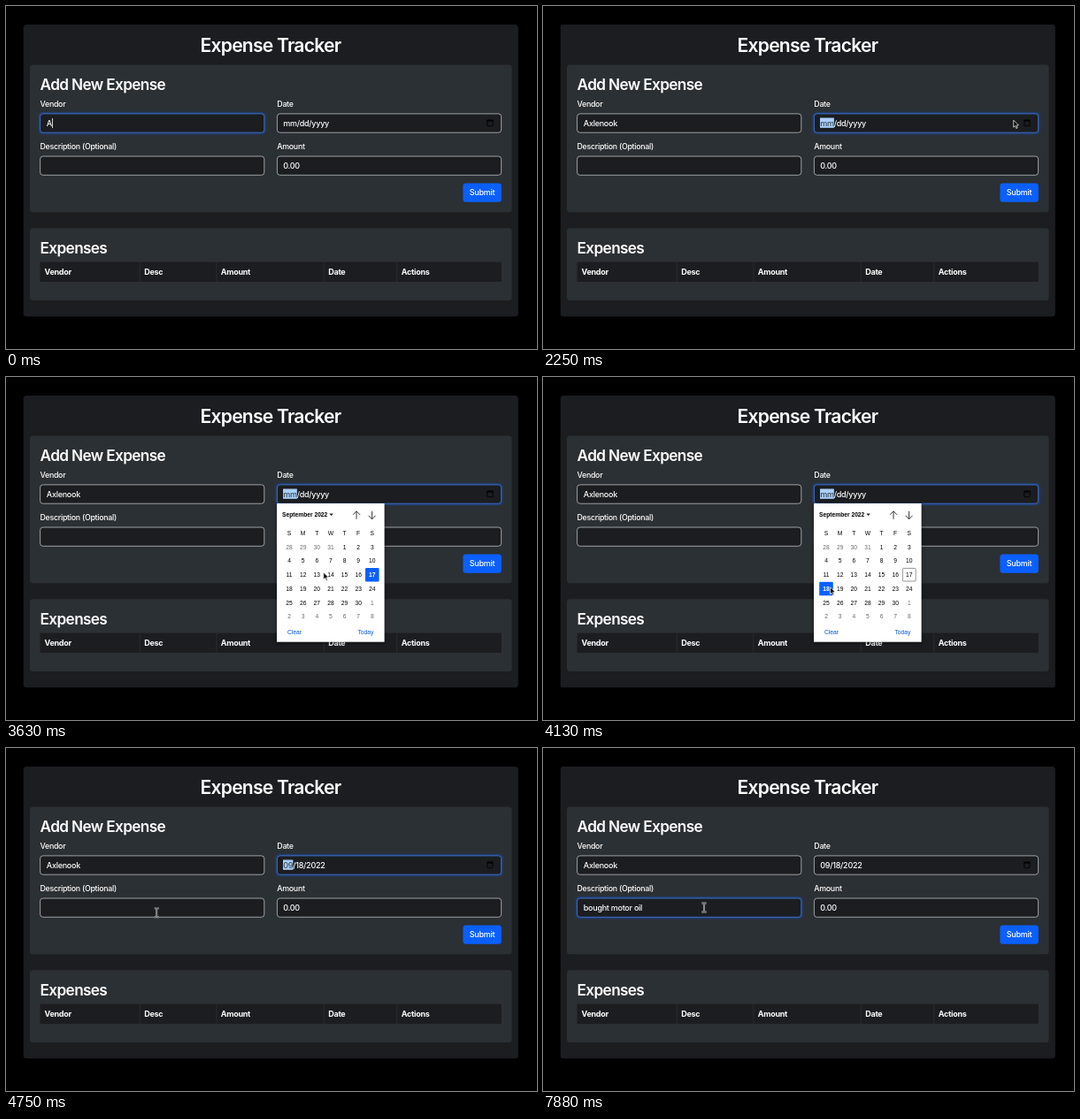
An HTML page with a canvas that plays this animation: 600 px wide and 388 px high, repeating every 8 s.

```html
<!DOCTYPE html>
<html lang="en">
<head>
<meta charset="utf-8">
<title>Expense Tracker</title>
<style>
  html, body { margin: 0; width: 100%; height: 100%; overflow: hidden; background: #000; }
  canvas { display: block; width: 600px; height: 388px; }
</style>
</head>
<body>
<canvas id="stage"></canvas>
<script>
const W = 600, H = 388, LOOP = 8000, STEP = 125;
const UI = 'Inter, "Open Sans", sans-serif';
const ARIAL = '"Liberation Sans", Arial, sans-serif';
const PANEL = '#1c1d21', CARD = '#2b3034', FIELD = '#1b1d20', BLUE = '#0a60ff';
const FIELD_W = 253.2, FIELD_H = 21.3;
const LEFT = 38.6, RIGHT = 306.4, TOP = 121.9, BOTTOM = 170;

const FOCUS_DATE = 1200, FOCUS_DESC = 4950;
const OPEN = 2750, PICK = 4125, CLOSE = 4250;
const SHOW = 625, HIDE = 5375, RETURN = 7875;

// Typing bursts: start, duration, text
const vendor = [[0, 500, 'Axlenook']];
const desc = [[5000, 0, ''], [5375, 500, 'bought '], [6125, 500, 'motor '], [7000, 375, 'oil']];

// Mouse moves: start, end, target
const moves = [
  [SHOW, 1000, 548, 211],
  [1125, 2000, 543, 211],
  [2000, 2250, 531.5, 129],
  [2250, 2500, 543.7, 131],
  [2875, 3875, 324.3, 237.5],
  [PICK, 4425, 168, 203],
  [4500, 4875, 171, 180.5],
  [7500, RETURN, 182, 180.5]
];

const canvas = document.getElementById('stage');
const ctx = canvas.getContext('2d');
const dpr = window.devicePixelRatio || 1;
canvas.width = W * dpr;
canvas.height = H * dpr;

const clamp = v => Math.max(0, Math.min(1, v));
const smooth = v => v * v * (3 - 2 * v);
const mix = (a, b, k) => a + (b - a) * k;

function text(s, x, y, size, opts = {}) {
  const { weight = 500, color = '#fff', family = UI, align = 'left', track = -0.03 } = opts;
  ctx.font = `${weight} ${size}px ${family}`;
  ctx.letterSpacing = `${track * size}px`;
  ctx.textAlign = align;
  ctx.fillStyle = color;
  ctx.fillText(s, x, y);
  return ctx.measureText(s).width;
}

const heading = (s, x, y, size, align) => text(s, x, y, size, { weight: 600, align, track: -0.037 });

function box(x, y, w, h, r, fill, stroke, line = 1) {
  ctx.beginPath();
  ctx.roundRect(x, y, w, h, r);
  if (fill) { ctx.fillStyle = fill; ctx.fill(); }
  if (stroke) { ctx.strokeStyle = stroke; ctx.lineWidth = line; ctx.stroke(); }
}

function lines(points, color, width) {
  ctx.beginPath();
  points.forEach(p => ctx.lineTo(...p));
  ctx.strokeStyle = color;
  ctx.lineWidth = width;
  ctx.stroke();
}

function drawField(label, x, y, focus) {
  text(label, x - 0.1, y - 7.9, 8.8);
  const border = [178, 182, 186].map((c, i) => mix(c, [70, 122, 224][i], focus));
  if (focus) box(x - 2.2, y - 2.2, FIELD_W + 4.4, FIELD_H + 4.4, 5, `rgba(13,88,240,${0.27 * focus})`);
  box(x, y, FIELD_W, FIELD_H, 3.2, FIELD, `rgb(${border})`, 0.85);
}

function drawTyped(bursts, x, y, t, focused) {
  let shown = '', last = 0;
  for (const [start, span, part] of bursts) {
    if (t < start) break;
    last = Math.min(t, start + span);
    const k = span ? (last - start) / span : 1;
    shown += part.slice(0, 1 + Math.floor((part.length - 1) * k));
  }
  const w = text(shown, x + 7.2, y + 14, 9);
  if (focused && (t - last) % 1000 < 500) {
    ctx.fillStyle = '#fff';
    ctx.fillRect(x + 7.3 + w, y + 5, 0.8, 11.2);
  }
}

function drawDate(t) {
  const [month, rest] = t < CLOSE ? ['mm', '/dd/yyyy'] : ['09', '/18/2022'];
  const active = t >= FOCUS_DATE && t < FOCUS_DESC;
  const x = RIGHT + 6.8, y = TOP + 14;
  const w = text(month, x, y, 9);
  if (active) {
    ctx.fillStyle = '#a9d0fb';
    ctx.fillRect(x - 0.2, TOP + 4.6, w + 0.4, 11.3);
    text(month, x, y, 9, { color: '#3a4754' });
  }
  text(rest, x + w, y, 9);
  box(543.8, 129.3, 6.2, 6.4, 0.6, null, '#030303', 0.9);
  ctx.fillStyle = '#030303';
  ctx.fillRect(543.4, 128.6, 7, 2);
}

function drawPage(t) {
  ctx.fillStyle = '#000';
  ctx.fillRect(0, 0, W, H);
  box(19.7, 21, 559.1, 330.3, 3.5, PANEL);
  box(27, 66.5, 544.6, 166.7, 3.5, CARD);
  box(27, 251.3, 544.6, 81.7, 3.5, CARD);
  heading('Expense Tracker', 298.9, 52, 21.1, 'center');
  heading('Add New Expense', LEFT, 95.2, 17.2);
  heading('Expenses', LEFT, 280.2, 17.2);

  const toDate = clamp((t - FOCUS_DATE) / 150), toDesc = clamp((t - FOCUS_DESC) / 150);
  drawField('Vendor', LEFT, TOP, 1 - toDate);
  drawField('Date', RIGHT, TOP, toDate - toDesc);
  drawField('Description (Optional)', LEFT, BOTTOM, toDesc);
  drawField('Amount', RIGHT, BOTTOM, 0);
  drawTyped(vendor, LEFT, TOP, t, t < FOCUS_DATE);
  drawTyped(desc, LEFT, BOTTOM, t, t >= FOCUS_DESC);
  drawDate(t);
  text('0.00', RIGHT + 6.8, BOTTOM + 14, 9);

  box(516.4, 200.4, 43.4, 21.4, 3.3, BLUE);
  text('Submit', 538, 214.2, 9, { align: 'center' });

  ctx.fillStyle = PANEL;
  ctx.fillRect(38.5, 289.6, 521.3, 22.4);
  [['Vendor', 38.5], ['Desc', 151.2], ['Amount', 237.8], ['Date', 359.2], ['Actions', 441.7]]
    .forEach(([label, x], i) => {
      text(label, x + 5, 304, 9, { weight: 700 });
      if (i) lines([[x, 289.6], [x, 312]], '#2c3034', 0.8);
    });
}

function drawPicker(picked) {
  ctx.save();
  ctx.shadowColor = 'rgba(0,0,0,.45)';
  ctx.shadowBlur = 4 * dpr;
  ctx.shadowOffsetY = dpr;
  ctx.fillStyle = '#fff';
  ctx.fillRect(306, 143, 121.6, 156.7);
  ctx.restore();

  const small = (s, x, y, color, weight = 400, align = 'center') =>
    text(s, x, y, 6.7, { color, weight, align, family: ARIAL, track: 0 });
  small('September 2022', 312, 157.9, '#000', 700, 'left');
  ctx.beginPath();
  ctx.moveTo(365.4, 154.6);
  ctx.lineTo(369.8, 154.6);
  ctx.lineTo(367.6, 157);
  ctx.fillStyle = '#222';
  ctx.fill();
  for (const [x, dir] of [[396, 1], [413.6, -1]]) {
    const y = v => 156.3 + v * dir;
    lines([[x, y(4.5)], [x, y(-4.5)]], '#222', 0.9);
    lines([[x - 4, y(-0.5)], [x, y(-4.5)], [x + 4, y(-0.5)]], '#222', 0.9);
  }

  const col = i => 320 + 15.63 * i;
  [...'SMTWTFS'].forEach((d, i) => small(d, col(i), 178.6, '#000'));
  for (let i = 0; i < 42; i++) {
    const n = i - 3, x = col(i % 7), y = 192.3 + 15.75 * Math.floor(i / 7);
    const inside = n > 0 && n < 31;
    const day = n < 1 ? n + 31 : n > 30 ? n - 30 : n;
    const on = n === picked;
    if (on) box(x - 7.8, y - 7.8, 15.6, 15.4, 1, BLUE);
    else if (n === 17) box(x - 7.4, y - 7.4, 14.8, 14.6, 1, null, '#666', 0.7);
    small(day, x, y + 2.4, on ? '#fff' : inside ? '#000' : '#6a6a6a', on ? 700 : 400);
  }
  small('Clear', 318, 290.6, '#0056e0', 400, 'left');
  small('Today', 397.5, 290.6, '#0056e0', 400, 'left');
}

function mouseAt(t) {
  let x = 541.5, y = 201;
  for (const [start, end, toX, toY] of moves) {
    const k = smooth(clamp((t - start) / (end - start)));
    x = mix(x, toX, k);
    y = mix(y, toY, k);
  }
  return [x, y];
}

function drawMouse([x, y]) {
  const overDesc = x > LEFT && x < LEFT + FIELD_W && y > BOTTOM && y < BOTTOM + FIELD_H;
  ctx.save();
  ctx.translate(x, y);
  if (overDesc) {
    for (const [color, width] of [['#d0d2d4', 1.9], ['#222', 0.7]]) {
      lines([[0, -4.6], [0, 4.6]], color, width);
      for (const s of [-1, 1]) lines([[-2.6, 5 * s], [-1, 5 * s], [0, 4.2 * s], [1, 5 * s], [2.6, 5 * s]], color, width);
    }
  } else {
    ctx.beginPath();
    [[0.2, 0.2], [0.2, 8.2], [2, 6.5], [3.3, 9.5], [4.7, 8.9], [3.4, 6], [5.9, 5.9]]
      .forEach(p => ctx.lineTo(...p));
    ctx.closePath();
    ctx.fillStyle = '#0a0a0a';
    ctx.fill();
    ctx.strokeStyle = '#f2f2f2';
    ctx.lineWidth = 0.75;
    ctx.stroke();
  }
  ctx.restore();
}

function draw(now) {
  const t = Math.floor((now % LOOP) / STEP) * STEP;
  ctx.setTransform(dpr, 0, 0, dpr, 0, 0);
  drawPage(t);
  if (t >= OPEN && t < CLOSE) drawPicker(t < PICK ? 17 : 18);
  if ((t >= SHOW && t < HIDE) || t >= RETURN) drawMouse(mouseAt(t));
}

const start = performance.now();
function tick() {
  draw(performance.now() - start);
  requestAnimationFrame(tick);
}
tick();
</script>
</body>
</html>
```
